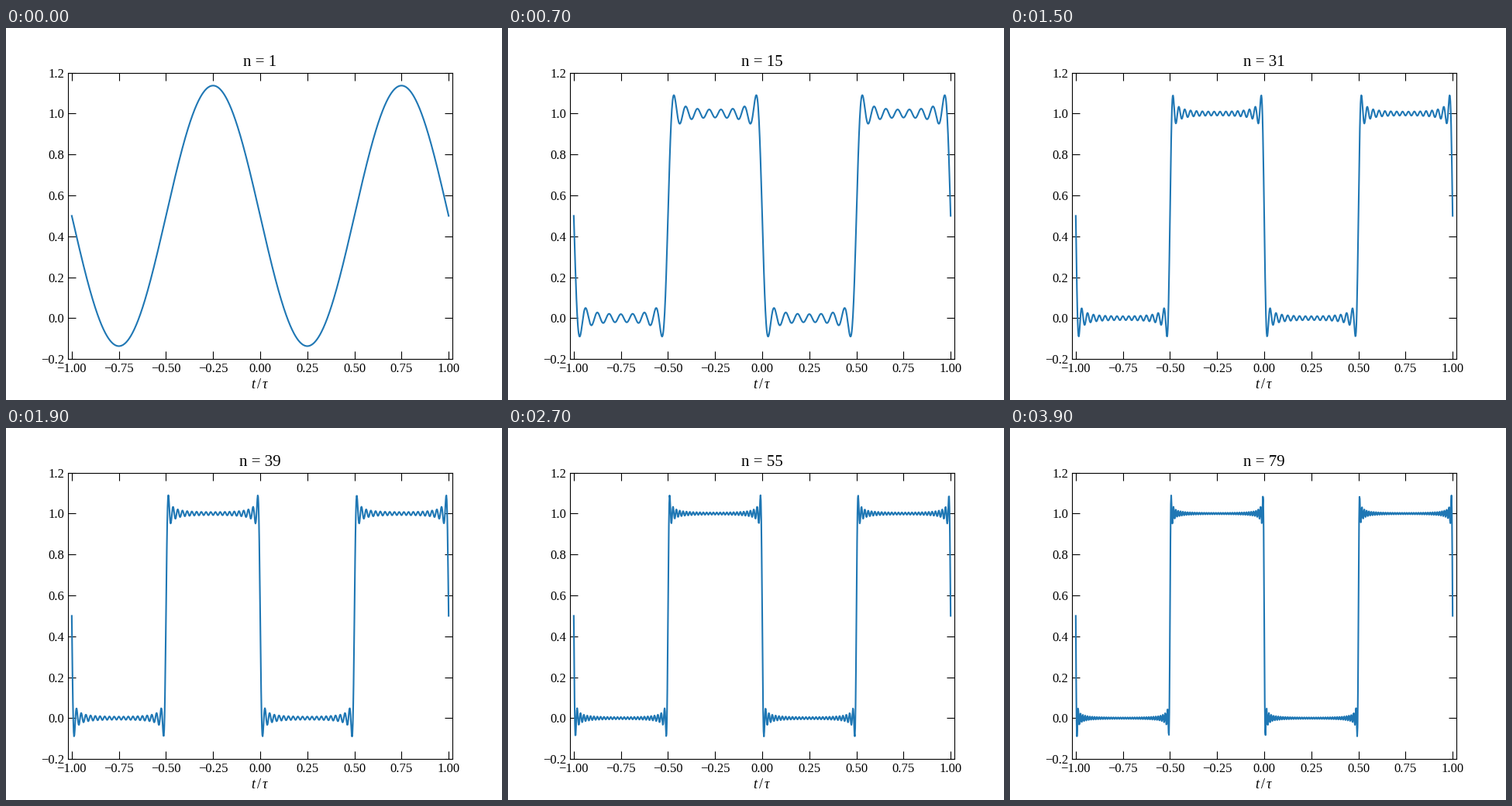
Recreate the animation shown at these times as a matplotlib script. Size 640 by 480 pixels, loop 4 s.

```python
import numpy as np
import matplotlib.pyplot as plt
from matplotlib.animation import FuncAnimation

FRAMES, INTERVAL = 40, 100
SERIF = "Liberation Serif"

plt.rcParams.update({
    "font.family": SERIF,
    "font.size": 12,
    "mathtext.fontset": "custom",
    "mathtext.rm": SERIF,
    "mathtext.it": SERIF + ":italic",
})

t = np.linspace(-1, 1, 1000)


def square_wave(n):
    """Fourier sum of a square wave, odd harmonics up to n."""
    m = np.arange(1, n + 1, 2)[:, None]
    return 0.5 - 2 / np.pi * np.sum(np.sin(2 * np.pi * m * t) / m, axis=0)


fig = plt.figure(figsize=(6.4, 4.8), dpi=100, facecolor="white")
ax = fig.add_axes([0.125, 0.11, 0.775, 0.77])
ax.set_xlim(-1.02, 1.02)
ax.set_ylim(-0.2, 1.2)
ax.set_xticks(np.linspace(-1, 1, 9))
ax.set_yticks(np.linspace(-0.2, 1.2, 8))
ax.xaxis.set_major_formatter("{x:.2f}")
ax.yaxis.set_major_formatter(lambda y, _: f"{y + 0:.1f}".replace("-0.0", "0.0").replace("-", "\u2212"))
ax.xaxis.set_major_formatter(lambda x, _: f"{x:.2f}".replace("-", "\u2212"))
ax.tick_params(direction="in", length=7.5, width=0.8, pad=3.5, top=True, right=True)

fig.text(328 / 640, 1 - 460.5 / 480, r"$t\,/\,\tau$", size=13, ha="center", va="center")
title = ax.set_title("", size=15, pad=6.5)
line, = ax.plot(t, square_wave(1), color="#1f77b4", lw=1.5)


def update(i):
    n = 2 * i + 1
    line.set_ydata(square_wave(n))
    title.set_text(f"n = {n}")
    return line, title


anim = FuncAnimation(fig, update, frames=FRAMES, interval=INTERVAL, repeat=True, repeat_delay=0)
plt.show()
```
